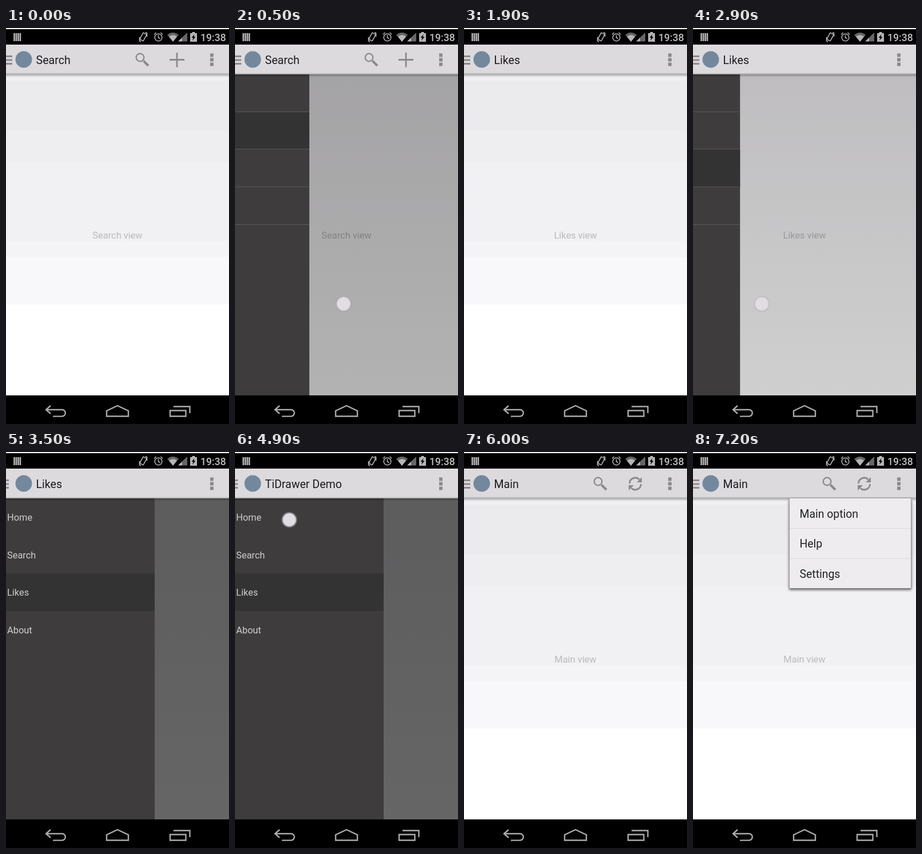
Write an HTML page that moves like this. It is 390x692 px and loops after 8000 ms.

```html
<!DOCTYPE html>
<html lang="en">
<head>
<meta charset="utf-8">
<title>Drawer demo</title>
<style>
  html, body { margin: 0; width: 100%; height: 100%; overflow: hidden; background: #fff; }
  svg { display: block; width: 390px; height: 692px; font-family: Roboto, "Open Sans", sans-serif; }
  .line { fill: none; stroke: #8b898b; }
</style>
</head>
<body>
<svg viewBox="0 0 390 692">
  <defs>
    <linearGradient id="sky" x2="0" y2="1">
      <stop stop-color="#ebe9ec"/><stop offset="1" stop-color="#fff"/>
    </linearGradient>
    <linearGradient id="drop" x2="0" y2="1">
      <stop stop-opacity=".28"/><stop offset="1" stop-opacity="0"/>
    </linearGradient>
    <filter id="blur" x="-10%" y="-10%" width="120%" height="125%"><feGaussianBlur stdDeviation="2.2"/></filter>
  </defs>

  <!-- page -->
  <rect y="81" width="390" height="561" fill="url(#sky)"/>
  <g id="bands"></g>
  <text id="view" x="195" y="368" font-size="16.4" text-anchor="middle" fill="#bbb9bc"></text>
  <rect id="scrim" y="81" width="390" height="561"/>

  <g id="drawer" font-size="16.4" fill="#cfcdcf">
    <rect y="81" width="260" height="561" fill="#3f3c3d"/>
    <rect id="chosen" width="260" height="65.6" fill="#333"/>
    <rect id="pressed" width="260" height="65.6" fill="#646464"/>
    <path id="rules" stroke="#5b595a" d="M0 146.5H260M0 211.5H260M0 277.5H260M0 343.5H260"/>
  </g>

  <!-- action bar -->
  <rect y="29" width="390" height="52" fill="#dddade"/>
  <rect y="79" width="390" height="2" fill="#bab8bb"/>
  <rect y="81" width="390" height="5" fill="url(#drop)"/>
  <path id="burger" stroke="#8b898b" stroke-width="3"/>
  <circle cx="31" cy="55" r="14.5" fill="#74889d"/>
  <text id="title" x="52.5" y="63" font-size="19.6" fill="#1c1b1c"></text>
  <g id="find" class="line">
    <circle cx="234.5" cy="51.5" r="6.8" stroke-width="2.3"/>
    <path stroke-width="4" d="M240.5 57.5L249 66"/>
  </g>
  <path id="plus" class="line" stroke-width="2.8" d="M286 55.5H312M299 43V68.5"/>
  <g id="refresh">
    <path class="line" stroke-width="2.8" d="M289.5 55a10 10 0 0 1 17-7M309.500 56a10 10 0 0 1-17 7"/>
    <path fill="#8b898b" d="M311 44v9h-9zM288 67v-9h9z"/>
  </g>
  <path fill="#8b898b" d="M357 44.500h6v6h-6zM357 52.500h6v6h-6zM357 60.500h6v6h-6z"/>

  <g id="menu" font-size="19.4" fill="#222">
    <rect x="168" y="83" width="214" height="158" rx="2" opacity=".7" filter="url(#blur)"/>
    <rect x="169" y="81" width="212" height="157" rx="1.500" fill="#eeecef"/>
    <path stroke="#dcdadd" d="M169 133.500H381M169 186.500H381"/>
    <text x="186.500" y="114.500">Main option</text>
    <text x="186.500" y="167">Help</text>
    <text x="186.500" y="220">Settings</text>
  </g>

  <circle id="dot" r="12.5" fill="#e0dee1" stroke="#77758a" stroke-opacity=".55" stroke-width="3"/>

  <!-- status bar -->
  <rect y="2" width="390" height="27"/>
  <path stroke="#b5b5b5" stroke-width="2.6" d="M14.500 9V23M18 9V23M21.500 9V23M25 9V23"/>
  <g fill="none" stroke="#b5b5b5" stroke-width="1.6">
    <rect x="236.500" y="9" width="7" height="13" rx="1" transform="rotate(28 240 15.500)"/>
    <path d="M233.500 16V22.500L236 24M246.500 15V9L244 7.500"/>
    <circle cx="266.500" cy="16.500" r="6.300"/>
    <path d="M266.500 12.500V17L269.500 18.500M259 11.500L262.500 8M274 11.500L270.500 8"/>
  </g>
  <path fill="#666" d="M282 12Q292 4 302 12L292 24zM309 15.500L317 8V23.500H309z"/>
  <path fill="#b5b5b5" d="M285 15Q292 9.500 299 15L292 24zM301 23.500L308.500 16V23.500zM322 9h3.500V7h5V9H334V24H322z"/>
  <path d="M329.500 11L324.500 17H327.500L326 22L331.500 15.500H328.500z"/>
  <text x="340" y="22.500" font-size="17.6" font-weight="500" fill="#bebebe">19:38</text>

  <!-- navigation bar -->
  <rect y="642" width="390" height="50"/>
  <g fill="none" stroke="#aaa" stroke-width="2.4">
    <path d="M78 660L70 667L78 674M70 667H98a5.800 5.800 0 0 1 0 11.600H82"/>
    <path d="M176 678.500V669L195 660L214 669V678.500z"/>
    <path d="M287 668.500H314.500V678.500H287zM293 661.500H321.500V673"/>
  </g>
</svg>
<script>
const el = id => document.getElementById(id);
const set = (id, attrs) => { for (const k in attrs) el(id).setAttribute(k, attrs[k]); };
const show = (id, on) => set(id, { visibility: on ? 'visible' : 'hidden' });
const clamp = x => Math.min(1, Math.max(0, x));
const rowY = i => 81 + i * 65.6;

const band = (y, end, fill) =>
  `<rect y="${y}" width="390" height="${end - y}" fill="${fill}"/>`;
el('bands').innerHTML = band(81, 92, '#f0eff1') + band(92, 180, '#ebeaec') +
  band(180, 234, '#eeedef') + band(234, 372, '#f1f0f2') + band(372, 400, '#f4f3f5') +
  band(400, 483, '#f8f7fa') + band(483, 642, '#fff');
['Home', 'Search', 'Likes', 'About'].forEach((name, i) =>
  el('drawer').insertAdjacentHTML('beforeend', `<text x="2" y="${120 + i * 65.6}">${name}</text>`));

const swipe = (t, start, span) => {
  const u = clamp((t - start) / span);
  return u * u * (3 - 2 * u);
};
const settle = (t, start) => (1 - clamp((t - start) / 580)) ** 3;

function slideAt(t) {
  if (t < 300) return 0;
  if (t < 1200) return swipe(t, 200, 600);
  if (t < 2700) return settle(t, 1200);
  if (t < 5100) return swipe(t, 2600, 800);
  return settle(t, 5100);
}

function titleAt(t) {
  if (t < 1000) return 'Search';
  if (t < 1900) return 'TiDrawer Demo';
  if (t < 3700) return 'Likes';
  return t < 6000 ? 'TiDrawer Demo' : 'Main';
}

function dotAt(t, slide, opening) {
  if (t >= 1200 && t < 1300) return [133.5, 251.5];
  if (t >= 4900 && t < 5200) return [95, 118.5];
  if (t >= 6900 && t < 7100) return [375, 65];
  if (opening && slide > 0 && slide < 0.6) return [slide * 380, 482];
}

function draw(t) {
  const slide = slideAt(t);
  const opening = t < 1200 || t >= 2700 && t < 5100;
  const page = t < 1300 ? 1 : t < 5200 ? 2 : 0;
  const press = t >= 1200 && t < 1300 ? 2 : t >= 5100 && t < 5200 ? 0 : -1;

  show('bands', slide === 0);
  el('view').textContent = ['Main', 'Search', 'Likes'][page] + ' view';
  set('scrim', { opacity: 0.6 * slide });
  set('drawer', { transform: `translate(${260 * (slide - 1)})` });
  set('chosen', { y: rowY(page) });
  set('pressed', { y: rowY(press) });
  show('pressed', press >= 0);
  show('rules', slide < 1);

  const tuck = clamp(opening ? 2 * slide - 1 : 2 * slide);
  const w = 11 - 6 * tuck;
  set('burger', { d: `M0 49.500H${w}M0 56H${w}M0 62.500H${w}` });
  el('title').textContent = titleAt(t);
  show('find', t < 1000 || t >= 6000);
  show('plus', t < 1000);
  show('refresh', t >= 6000);

  const pop = clamp((t - 6900) / 300);
  const grow = 0.9 + 0.1 * pop;
  set('menu', { opacity: pop, transform: `translate(381 81) scale(${grow}) translate(-381 -81)` });

  const dot = dotAt(t, slide, opening);
  show('dot', dot);
  if (dot) set('dot', { cx: dot[0], cy: dot[1], 'stroke-opacity': opening && dot[1] === 482 ? 0.15 : 0.55 });
}

const begin = performance.now();
function tick() {
  const t = (performance.now() - begin) % 8000;
  draw(Math.floor(t / 100) * 100); // the screen refreshes ten times a second
  requestAnimationFrame(tick);
}
tick();
</script>
</body>
</html>
```
